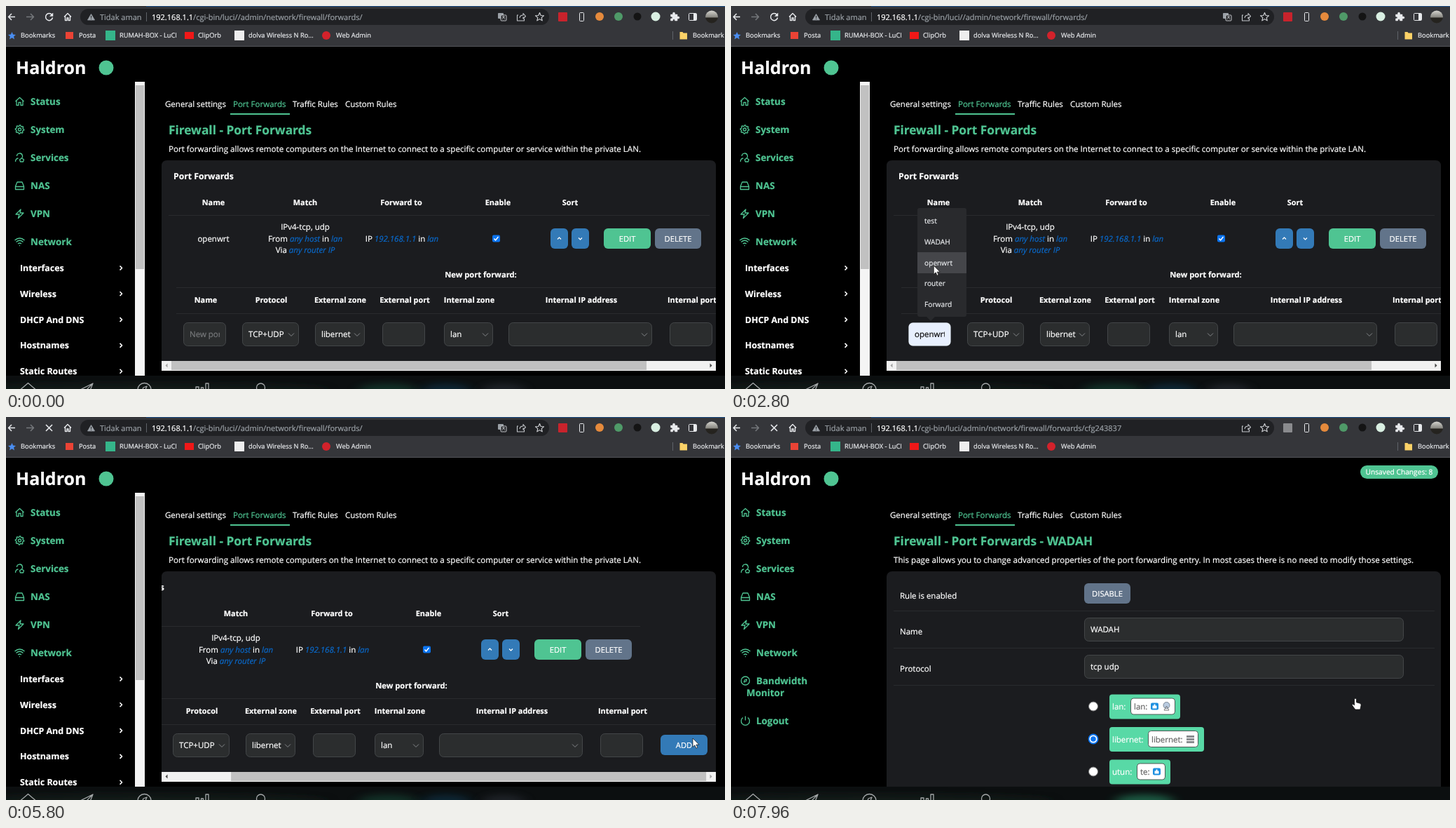
Recreate the animation shown at these times as an HTML page. Size 1026 px wide and 546 px high, loop 8 s.

```html
<!DOCTYPE html>
<html lang="en">
<head>
<meta charset="utf-8">
<title>Port forwards</title>
<style>
html, body { margin: 0; width: 100%; height: 100%; overflow: hidden; background: #000; }
svg { display: block; font-family: "Open Sans", "Noto Sans", sans-serif; text-rendering: geometricPrecision; cursor: default; }
text { color: #fff; }
text, tspan { fill: currentColor; stroke: currentColor; stroke-width: .22px; }
.b { font-weight: 700; }
.m { text-anchor: middle; }
.g { color: #4fc492; }
.dim { color: #9aa0a6; }
.a { color: #0a68c8; font-style: italic; }
</style>
</head>
<body>
<svg id="stage" width="1026" height="546" viewBox="0 0 1026 546">
  <defs>
    <clipPath id="card"><path d="M222 546V228q0-8 8-8H1005q8 0 8 8V546z"/></clipPath>
    <clipPath id="name"><path d="M262 452h43v32h-43z"/></clipPath>
    <clipPath id="dock"><path d="M0 527h1026v19H0z"/></clipPath>
    <filter id="blur" x="-50%" y="-100%" width="200%" height="300%"><feGaussianBlur stdDeviation="9 5"/></filter>
    <linearGradient id="photo" x2="0" y2="1"><stop stop-color="#d5d4cf"/><stop offset=".5" stop-color="#8b8a84"/><stop offset=".6" stop-color="#25231f"/></linearGradient>
  </defs>
  <g id="scene"></g>
</svg>
<script>
const LOOP = 8000, GREEN = '#4fc492', BLUE = '#337ab7', SLATE = '#62748a', LINE = '#292b2e';
const ENTRY = 'WADAH';
const scene = document.getElementById('scene');

// time, x, y, pointer shape from then on
const path = [
  [0, 955, 562, 'arrow'], [490, 955, 562, 'arrow'], [790, 584, 473, 'beam'], [1050, 584, 473, 'arrow'],
  [1480, 290, 462, 'beam'], [1810, 288, 463, 'beam'], [1870, 290, 465, 'beam'], [2300, 290, 465, 'beam'],
  [2450, 290, 440, 'arrow'], [3010, 289, 338, 'arrow'], [3080, 289, 338, 'beam'], [3630, 289, 338, 'arrow'],
  [3780, 562, 458, 'arrow'], [3830, 569, 446, 'arrow'], [3900, 590, 442, 'arrow'], [4620, 590, 442, 'arrow'],
  [4690, 709, 433, 'arrow'], [4760, 709, 433, 'arrow'], [5300, 960, 462, 'hand'], [5470, 978, 460, 'hand'],
  [5600, 980, 458, 'hand'], [5800, 980, 458, 'arrow'], [5940, 980, 458, 'arrow'], [6500, 826, 398, 'hand'],
  [6780, 826, 398, 'hand'], [7400, 891, 401, 'hand'], [LOOP, 891, 401, 'hand']
];

const T = (s, x, y, size = 11.5, cls = '', color = '') =>
  `<text x="${x}" y="${y}" font-size="${size}" class="${cls}"${color && ` style="color:${color}"`}>${s}</text>`;
const R = (x, y, w, h, fill, r = 0, stroke = 'none') =>
  `<rect x="${x}" y="${y}" width="${w}" height="${h}" rx="${r}" fill="${fill}" stroke="${stroke}"/>`;
const O = (x, y, r, fill, stroke = 'none', w = 1) =>
  `<circle cx="${x}" cy="${y}" r="${r}" fill="${fill}" stroke="${stroke}" stroke-width="${w}"/>`;
const P = (d, stroke, w = 1.3, fill = 'none') =>
  `<path d="${d}" fill="${fill}" stroke="${stroke}" stroke-width="${w}" stroke-linejoin="round"/>`;
const G = (s, attrs) => `<g ${attrs}>${s}</g>`;
const a = s => `<tspan class="a">${s}</tspan>`;
const rule = (y, x1 = 232, x2 = 1004) => R(x1, y, x2 - x1, 1, LINE);
const box = (x, y, w, h) => R(x + .5, y + .5, w - 1, h - 1, '#2b2d2e', 6, '#434648');

function pointer(t) {
  const i = path.findIndex(k => k[0] > t);
  const [t0, x0, y0, shape] = path[i - 1], [t1, x1, y1] = path[i];
  const u = (t - t0) / (t1 - t0), e = u * u * (3 - 2 * u);
  return { x: x0 + (x1 - x0) * e, y: y0 + (y1 - y0) * e, shape };
}

const beam = 'M-3.5-7.5q3 0 3.5 1.5q.5-1.5 3.5-1.5M0-6v12M-3.5 7.5q3 0 3.5-1.5q.5 1.5 3.5 1.5';
const pointers = {
  arrow: P('M0 0v12.5l2.9-2.7 1.9 4.4 2-.9-1.9-4.2h4z', '#111', .7, '#fff'),
  beam: P(beam, '#111', 2.4) + P(beam, '#eee', 1.1),
  hand: P('M-1.5 1.2q1.5-2.4 3 0v4.6l5 1.4q2 .6 1.6 2.8l-1.3 6h-7l-4.4-6q-.6-1.6.9-1.7l2.2 1.5z', '#111', .8, '#fff')
};
const drawPointer = ({ x, y, shape }) => G(pointers[shape], `transform="translate(${x.toFixed(1)} ${y.toFixed(1)})"`);

function chrome(url, loading, busy) {
  const w = '#e8eaed';
  return R(0, 0, 1026, 58, '#35363a') + R(200, 0, 826, 1, '#20528a') + R(0, 57, 1026, 1, '#55565a') +
    R(106, 4, 669, 23, '#202124', 11.5) +
    P('M13 15.5H4M8 11l-4.5 4.5 4.5 4.5', w, 1.5) + P('M29 15.5h10M35 11l4.5 4.5-4.5 4.5', '#75787c', 1.5) +
    (loading ? P('M57 11l9 9M66 11l-9 9', w, 1.6) : P('M65.5 12.5a5 5 0 1 0 1 4', w, 1.5) + P('M67 10v4.5h-4.5z', w, .5, w)) +
    P('M83 15.5l5-5 5 5M84.5 14.5v6h2.5v-3.5h2v3.5h2.5v-6', w, 1.4) +
    P('M121.5 11.5l5 8.5h-10z', '#9aa0a6', .8, '#9aa0a6') + R(121, 14, 1, 3, '#202124') + R(121, 18, 1, 1, '#202124') +
    T('Tidak aman', 134, 20, 11, 'dim') + R(200, 9, 1, 13, '#5f6368') +
    T(`192.168.1.1<tspan class="dim">/cgi-bin/luci/${url}</tspan>`, 208, 20, 11) +
    (busy ? '' : R(702, 10, 8, 8, '#9aa0a6', 1) + R(706, 13, 8, 8, '#202124', 1, '#c4c7cb') + P('M708 15.5h4M710 14v2l-2 3M710 16l2 3', '#c4c7cb', .8)) +
    P('M731 13h-1.5v8h10v-3M733 17q.5-4 5-4v-2.5l3.5 4-3.5 3.5v-2.5', '#c4c7cb', 1.1) +
    P('M761.5 9.5l1.7 4 4.3.4-3.3 2.8 1 4.2-3.7-2.3-3.7 2.3 1-4.2-3.3-2.8 4.3-.4z', '#d5d7da', 1.1) +
    R(788, 9, 13, 13, busy ? '#8a8b8e' : '#c8232c', 1) + R(818.5, 9.5, 6, 12, 'none', 1, w) +
    O(847, 15, 6, '#e58a3c') + O(874, 15, 6, '#4f9a68') + O(901, 15, 5.5, '#141414') + O(927, 15, 6.5, '#d9efe2') +
    P('M948.5 12h3q-.5-3 1.5-3t1.5 3h3.5v3q3-.5 3 1.5t-3 1.5v3h-3.5q0-2.5-1.5-2.5t-1.5 2.5h-3v-3q2.5 0 2.5-1.5t-2.5-1.5z', w, .5, w) +
    R(974.5, 10.5, 11, 10, 'none', 1, w) + R(981, 11, 4, 9, w) + O(1007, 15.5, 9, 'url(#photo)') +
    P('M8.5 37l1.6 3.5 3.9.4-2.9 2.6.9 3.9-3.5-2.1-3.5 2.1.9-3.9-2.9-2.6 3.9-.4z', 'none', 0, '#4a8df0') +
    R(85, 37, 11, 10, '#ea4335') + R(142, 35, 14, 14, '#35b58a') + R(255, 37, 13, 10, '#f01818') + R(326, 35, 14, 14, '#eee') + O(457, 42, 6, '#d3222b') +
    [['Bookmarks', 21], ['Posta', 104], ['RUMAH-BOX - LuCI', 162], ['ClipOrb', 274], ['dolva Wireless N Ro...', 346], ['Web Admin', 471], ['Bookmark', 980]]
      .map(([s, x]) => T(s, x, 45, 9.3, '', w)).join('') +
    R(951, 36, 1, 12, '#5f6368') + P('M961.5 37h4l1 1.5h5.5v9h-10.5z', 'none', 0, '#fbd267');
}

// a toothed ring around the origin
const cog = 'M' + Array.from({ length: 32 }, (_, i) => {
  const r = i % 4 < 2 ? 6.2 : 4.8, th = i * Math.PI / 16;
  return `${(r * Math.cos(th)).toFixed(1)} ${(r * Math.sin(th)).toFixed(1)}`;
}).join('L') + 'zM-2 0a2 2 0 1 0 4 0a2 2 0 1 0-4 0';

const menuIcons = {
  Status: 'M-6 0L0-5.5 6 0M-4.5-1.5V5.5h3v-4h3v4h3v-7',
  System: cog,
  Services: 'M-4-2a4 4 0 1 1 5.5 3.7M-6 6q0-4.5 4-5M0 3l3-2 3 2-1 3h-4z',
  NAS: 'M-6 1l2.5-6h7l2.5 6v4.5h-12zM-6 1.5h12',
  VPN: 'M1.5-6l-7 7h5l-1.5 5.5 7.5-7.5h-5z',
  Network: 'M-7-2q7-6 14 0M-5 .5q5-4.5 10 0M-2.5 3q2.5-2 5 0M-.5 5.5h1',
  Bandwidth: 'M-6 0a6 6 0 1 0 12 0a6 6 0 1 0-12 0M-2 2l1-3 3-1-1 3z',
  Logout: 'M-3.5-4.5a6 6 0 1 0 7 0M0-6.5v6'
};

function sidebar(collapsed) {
  const dx = collapsed ? 1 : 0;
  const item = (s, y) => T(s, 35 + dx, y + 5, 13.4, 'b g') +
    G(P(menuIcons[s], GREEN), `transform="translate(${19.5 + dx} ${y})"`);
  const out = ['Status', 'System', 'Services', 'NAS', 'VPN', 'Network'].map((s, i) => item(s, 136 + 40 * i)).join('');
  if (collapsed) return out + item('Bandwidth', 376) + T('Monitor', 22, 398, 13.4, 'b g') + item('Logout', 433);
  return out + ['Interfaces', 'Wireless', 'DHCP And DNS', 'Hostnames', 'Static Routes'].map((s, i) => {
    const y = 373.5 + 36.8 * i;
    return T(s, 20, y + 4.5, 12.4, 'b') + P(`M162.5 ${y - 3}l3 3-3 3`, '#fff', 1.6);
  }).join('') + R(184, 108, 14, 420, '#f4f4f4') + R(185, 113, 12, 262, '#c1c1c1');
}

function button(cur, x, y, w, label, fill, hover, scroll = 0) {
  const over = cur.x + scroll > x && cur.x + scroll < x + w && cur.y > y && cur.y < y + 29;
  return R(x, y, w, 29, over ? hover : fill, 6) + T(label, x + w / 2, y + 18.5, 11.2, 'm');
}

function ruleRow(cur, name, lines, to, y, scroll) {
  const chevron = (x, dir) => P(`M${x - 2.5} ${y + dir}l2.5 ${-2.5 * dir} 2.5 ${2.5 * dir}`, '#fff', 1.2);
  const first = y - 16.5 * (lines.length - 1) / 2, top = y - 14.5;
  return T(name, 296, y + 4, 11.5, 'm') +
    lines.map((s, i) => T(s, 427, first + 16.5 * i + 4, 11.5, 'm')).join('') + T(to, 565, y + 4, 11.5, 'm') +
    R(694, y - 5, 11, 10, '#0b74f0', 2) + P(`M696.5 ${y}l2 2.5 4-5`, '#fff', 1.4) +
    button(cur, 777, top, 25, '', BLUE, '#6a62d2', scroll) + button(cur, 807, top, 25, '', BLUE, '#6a62d2', scroll) +
    chevron(789.5, 1) + chevron(819.5, -1) +
    button(cur, 853, top, 67, 'EDIT', GREEN, '#3da77a', scroll) +
    button(cur, 926, top, 66, 'DELETE', SLATE, '#505f72', scroll);
}

// header, centre, field x, field width, value, is a select
const fields = [
  ['Name', 285, 253, 61], ['Protocol', 378.5, 337, 81, 'TCP+UDP', 1], ['External zone', 477, 441, 71, 'libernet', 1],
  ['External port', 569, 537, 61], ['Internal zone', 661, 625, 70, 'lan', 1], ['Internal IP address', 821, 717, 205, '', 1],
  ['Internal port', 979, 947, 61]
];

function newForm(cur, value, scroll) {
  return T('New port forward:', 677.5, 387, 11.2, 'b m') + rule(401, 243, 1112) + rule(438, 243, 1112) +
    fields.map(([head, c, x, w, text = '', select]) => T(head, c, 423, 10.9, 'b m') + box(x, 451, w, 34) +
      T(text, x + 9, 472) + (select ? P(`M${x + w - 15} 466.5l4 4 4-4`, '#85888b', 1) : '')).join('') +
    (value ? R(253.5, 451.5, 60, 33, '#e8f0fe', 6) : '') +
    G(T(value || 'New port forward', 262, 472, 11.5, '', value ? '#111' : '#77797b'), 'clip-path="url(#name)"') +
    button(cur, 1033, 453, 67, 'ADD', '#02a8ee', BLUE, scroll);
}

function scrollbar(cur, scroll) {
  const hover = cur.y > 506 && cur.y < 520;
  const arrow = (x, dir, on) => P(`M${x + 1.5 * dir} 512.5l${-3 * dir}-3v6z`, 'none', 0, on ? '#444' : '#a3a3a3');
  return R(222, 506, 791, 14, '#f1f1f1') + R(236 + scroll * .86, 506, 678, 13, hover ? '#a8a8a8' : '#c1c1c1') +
    arrow(229, -1, scroll > 0) + arrow(1006, 1, scroll < 99);
}

function listPage(cur, two, value, scroll) {
  const heads = [['Name', 296], ['Match', 427], ['Forward to', 564], ['Enable', 702], ['Sort', 805]];
  const from = zone => `From ${a('any host')} in ${zone}`, via = `Via ${a('any router IP')}`;
  let body = T('Port Forwards', 239, 247, 12.2, 'b') + heads.map(([s, x]) => T(s, x, 284, 10.9, 'b m')).join('') + rule(298) +
    ruleRow(cur, 'openwrt', ['IPv4-tcp, udp', from(a('lan')), via], `IP ${a('192.168.1.1')} in ${a('lan')}`, 331.5, scroll);
  if (two) body += rule(364) +
    ruleRow(cur, ENTRY, ['IPv4-tcp, udp', from(''), a('libernet'), via], `${a('any host')} in ${a('lan')}`, 405.5, 0);
  body += G(newForm(cur, value, scroll), `transform="translate(0 ${two ? 82 : 0})"`);
  return G(R(222, 220, 791, two ? 326 : 300, '#1b1c1f') + G(body, `transform="translate(${-scroll} 0)"`), 'clip-path="url(#card)"') +
    (two ? '' : scrollbar(cur, scroll));
}

function editPage() {
  const port = (x, y) => R(x, y - 5, 11, 10, '#1d8fe0', 2) + P(`M${x + 2.5} ${y + 3}v-4h2v-2h2v2h2v4z`, 'none', 0, '#fff');
  const radio = (y, on) => O(517, y, 6.5, '#fff', on ? '#0b74f0' : '#777', on ? 1.8 : 1) + (on ? O(517, y, 3.8, '#0b74f0') : '');
  const zone = (y, w, label, x, iw, inner, icons, on) => radio(y, on) + R(540, y - 17, w, 35, '#58d9a6', 4) +
    T(label, 544, y + 4.5) + R(x + .5, y - 11.5, iw, 23, '#fff', 4, '#4b5a55') + T(inner, x + 5, y + 4.5, 11.5, '', '#666') + icons;
  const rack = [-5, -1, 3].map(d => R(650, 459 + d, 11, 3, '#8a8d90')).join('');
  return R(222, 220, 791, 340, '#1b1c1f', 8) +
    T('Rule is enabled', 241, 259) + T('Name', 241, 310) + T('Protocol', 241, 363) +
    R(504, 237, 66, 29, SLATE, 6) + T('DISABLE', 537, 256, 11.2, 'm') +
    box(504, 286, 456, 34) + T(ENTRY, 513, 307) + box(504, 339, 456, 34) + T('tcp udp', 513, 360) +
    rule(276) + rule(329) + rule(382) +
    zone(412.5, 101, 'lan:', 570, 63, 'lan:', port(599, 412.5) + O(621.5, 411, 4.5, '#b9cbe0', '#7b8794') + P('M618 418l3.5-6 3.5 6z', '#777', 1)) +
    zone(459, 135, 'libernet:', 595, 71, 'libernet:', rack, true) +
    zone(505.5, 87, 'utun:', 579, 40, 'te:', port(602, 505.5));
}

const names = ['test', ENTRY, 'openwrt', 'router', 'Forward'];

function suggestions(row) {
  return R(266, 288, 70, 155, '#292a2d', 3) + P('M279 443h12l-6 6z', 'none', 0, '#292a2d') +
    names.map((s, i) => (i === row ? R(266, 291 + 30 * i, 70, 30, '#45464a') : '') + T(s, 276, 310 + 29.8 * i, 10.2, '', '#e8eaed')).join('');
}

function dock(page) {
  const glow = (x, w, fill, o) => `<ellipse cx="${x}" cy="547" rx="${w}" ry="9" fill="${fill}" opacity="${o}" filter="url(#blur)"/>`;
  const glows = page === 'list' ? glow(545, 42, '#1d6b50', .35) + glow(628, 34, '#0b4f73', .35) + glow(710, 30, '#3c4350', .35)
    : page === 'edit' ? glow(590, 42, '#2fae7c', .45) : glow(600, 380, '#25282b', .6);
  return G(R(0, 527, 1026, 19, '#0c0f10') + glow(200, 260, '#14231d', .6) + glows, 'clip-path="url(#dock)"') +
    P('M21 546.5l10.5-9 10.5 9M106 547l18-9-4 10M115 547l9-9', '#a3a7a8') +
    O(197.5, 547, 9.5, 'none', '#a3a7a8', 1.3) + P('M194 549l2-5 5-2-2 5z', '#a3a7a8') +
    P('M271 547v-4h4v4M278.5 547v-3h3v3M285 547v-9h4v9', '#a3a7a8') + O(363.5, 544, 6, 'none', '#a3a7a8', 1.3);
}

function draw(t) {
  const cur = pointer(t);
  const page = t < 5940 ? 'list' : t < 7900 ? 'list2' : 'edit';
  const fresh = t >= 5940 && t < 6140;
  const loading = t >= 5600 && t < 6140 || t >= 7560;
  const url = t < 5940 ? '/admin/network/firewall/forwards/' : 'admin/network/firewall/forwards' + (t < 7760 ? '' : '/cfg243837');
  const scroll = page !== 'list' || t < 4160 ? 0 : t < 4230 ? 55 : 99;
  const open = t >= 1700 && t < 3080;
  const row = open && cur.y < 441 ? Math.floor((cur.y - 291) / 30) : -1;
  const value = page !== 'list' ? '' : t >= 3080 ? ENTRY : names[row] || '';
  const edit = page === 'edit';

  return chrome(url, loading, fresh || t >= 7760) +
    T('Haldron', 14, 97, 25, 'b') + O(143, 88, 10.5, GREEN) + sidebar(fresh || edit) +
    T('General settings', 227, 144) + T('Port Forwards', 324, 144, 11.5, 'g') + T('Traffic Rules', 409, 144) + T('Custom Rules', 484, 144) +
    R(320, 153, 85, 2, GREEN) +
    T('Firewall - Port Forwards' + (edit ? ' - ' + ENTRY : ''), 232, 183, 17.3, 'b g') +
    T(edit ? 'This page allows you to change advanced properties of the port forwarding entry. In most cases there is no need to modify those settings.'
      : 'Port forwarding allows remote computers on the Internet to connect to a specific computer or service within the private LAN.', 232, 208, 11.61) +
    (page === 'list' ? '' : R(898, 69, 111, 19, GREEN, 9.5) + T('Unsaved Changes: 8', 953.5, 82, 10.2, 'm')) +
    (edit ? editPage() : listPage(cur, page === 'list2', value, scroll)) +
    (open ? suggestions(row) : '') + dock(page) + drawPointer(cur);
}

let shown = '';
const start = performance.now();
function tick() {
  const next = draw((performance.now() - start) % LOOP);
  if (next !== shown) scene.innerHTML = shown = next;
  requestAnimationFrame(tick);
}
tick();
</script>
</body>
</html>
```
